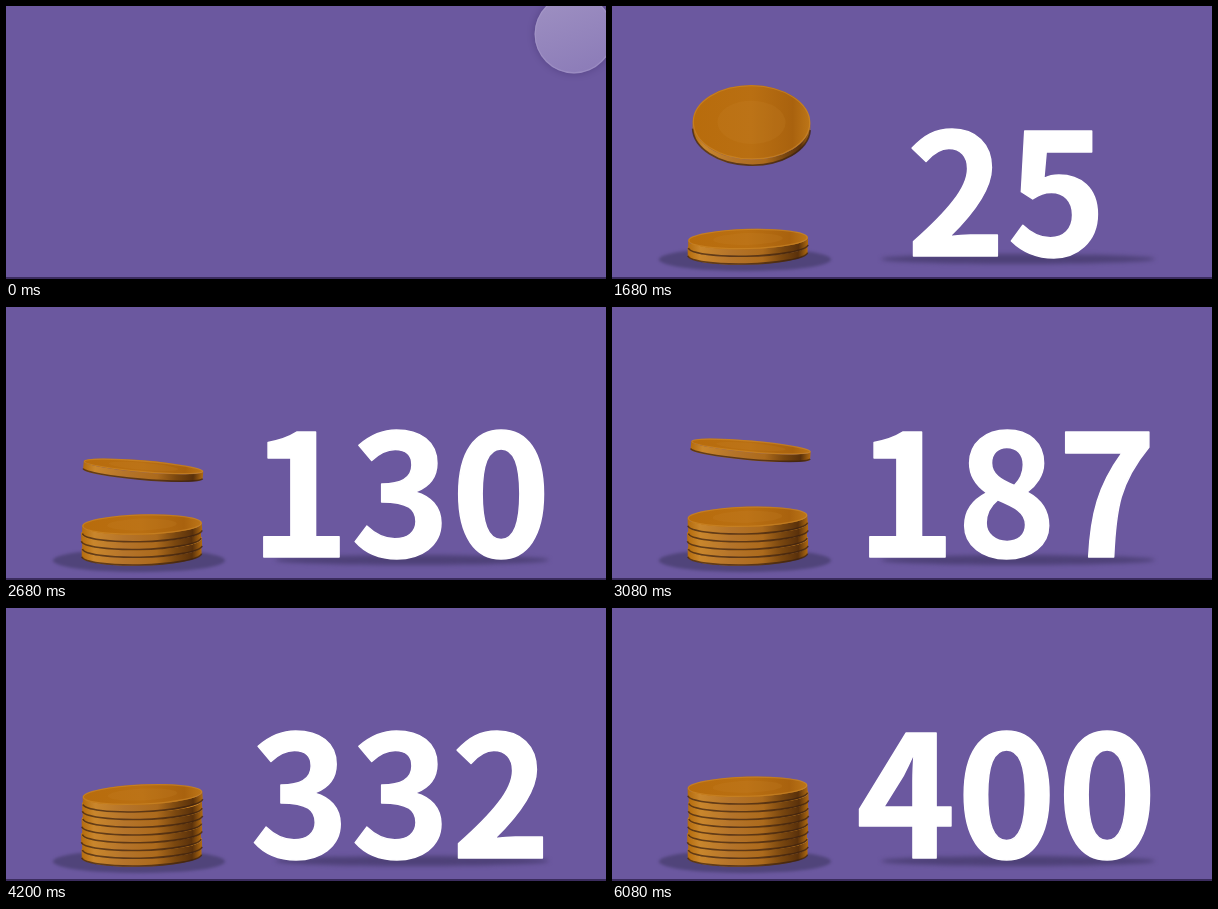
An HTML page with a canvas for the animation above (6160 ms loop, 600 by 273 pixels).

```html
<!DOCTYPE html>
<html lang="en">
<head>
<meta charset="utf-8">
<title>Coin counter</title>
<style>
  html, body { margin: 0; width: 100%; height: 100%; overflow: hidden; background: #6b589f; }
  canvas { display: block; width: 600px; height: 273px; }
</style>
</head>
<body>
<canvas id="stage" width="600" height="273"></canvas>
<script>
const ctx = document.getElementById('stage').getContext('2d');
const LOOP = 6160, STEP = 40;
const FLAT = 0.17, THICK = 7.75, STACK_X = 135.5, FLOOR = 248.5;
const FONT = 'bold 169px "Noto Sans CJK SC", "Noto Sans CJK JP", "Noto Sans CJK", sans-serif';

// Landing time of each coin, bottom to top
const LANDINGS = [890, 1228, 1770, 2285, 2720, 3130, 3540, 3960, 4500];
const SHIFT = [0, 0.5, -0.5, 0.5, 0, 1, 0.5, 1, 0];

// Counter: time, value, slope per ms
const COUNT = [
  [1080, 0, 0], [2280, 79, 0.1], [3080, 187, 0.132], [4200, 332, 0.118], [4840, 400, 0.08]
];

const clamp = (v, lo, hi) => Math.min(hi, Math.max(lo, v));

function countAt(t) {
  if (t <= COUNT[0][0]) return 0;
  for (let i = 1; i < COUNT.length; i++) {
    const [t0, v0, m0] = COUNT[i - 1], [t1, v1, m1] = COUNT[i];
    if (t > t1) continue;
    const d = t1 - t0, u = (t - t0) / d, u2 = u * u, u3 = u2 * u;
    return Math.round(v0 + (v1 - v0) * (3 * u2 - 2 * u3)
      + d * (m0 * (u3 - 2 * u2 + u) + m1 * (u3 - u2)));
  }
  return 400;
}

function ellipse(x, y, rx, ry, fill) {
  ctx.beginPath();
  ctx.ellipse(x, y, rx, ry, 0, 0, Math.PI * 2);
  ctx.fillStyle = fill;
  ctx.fill();
}

function gradient(x0, x1, stops) {
  const g = ctx.createLinearGradient(x0, 0, x1, 0);
  for (const [at, color] of stops) g.addColorStop(at, color);
  return g;
}

const EDGE = [[0, '#b56c0c'], [0.1, '#c9862c'], [0.35, '#b5742a'], [0.62, '#ac6a1c'],
              [0.78, '#7a470f'], [0.92, '#5a310b'], [1, '#b06a10']];
const FACE = [[0, '#b86c0c'], [0.5, '#b96f12'], [0.85, '#a9620e'], [1, '#bd7618']];

// open: 1 faces the viewer, 0 lies edge-on
function coin(x, y, open, tilt) {
  const lean = Math.sqrt(Math.max(0, 1 - open * open));
  const r = 55 + 5 * lean, ry = r * open, h = 1 + (THICK - 1) * lean;
  ctx.save();
  ctx.translate(x, y);
  ctx.rotate(tilt * Math.PI / 180);

  ctx.beginPath();
  ctx.ellipse(0, 0, r, ry, 0, Math.PI, 0, true);
  ctx.lineTo(r, h);
  ctx.ellipse(0, h, r, ry, 0, 0, Math.PI);
  ctx.closePath();
  ctx.fillStyle = gradient(-r, r, EDGE);
  ctx.fill();

  ctx.beginPath();
  ctx.ellipse(0, h - 0.7, r, ry, 0, 0.04, Math.PI - 0.04);
  ctx.strokeStyle = 'rgba(58, 32, 16, 0.7)';
  ctx.lineWidth = 1.6;
  ctx.stroke();

  ellipse(0, 0, r, ry, gradient(-r, r, FACE));
  ctx.beginPath();
  ctx.ellipse(0, 0, r - 0.7, Math.max(1, ry - 0.7), 0, 0, Math.PI * 2);
  ctx.strokeStyle = 'rgba(212, 144, 48, 0.5)';
  ctx.lineWidth = 1.2;
  ctx.stroke();
  ellipse(0, 0, r * 0.58, ry * 0.58, 'rgba(200, 132, 44, 0.18)');
  ctx.restore();
}

function drawCoins(t) {
  LANDINGS.forEach((land, i) => {
    const left = land - t;
    if (left > 320) return;
    const x = STACK_X + SHIFT[i], y = FLOOR - THICK * (i + 1);
    if (left > 0) {
      const height = 1.3 * left - 0.001 * left * left;
      const spin = Math.abs(Math.sin(Math.max(0, left - 45) / 103 * Math.PI / 2));
      const flat = FLAT - 0.07 * Math.min(1, left / 40);
      if (i && height < 25) {
        ellipse(x, y + THICK + 1, 59, 10, `rgba(50, 26, 14, ${0.85 * (1 - height / 25)})`);
      }
      coin(x + Math.min(left * 0.05, 8), y - height, Math.max(flat, spin), 5 * Math.sin(left / 30));
    } else {
      const u = -left;
      const wobble = u < 360 ? -4 * Math.exp(-u / 200) * Math.sin(u / 115) : 0;
      coin(x, y, FLAT, wobble - 1.5);
    }
  });
}

function drawShadows() {
  ctx.save();
  ctx.filter = 'blur(1.5px)';
  ellipse(133, 253.5, 86, 11.5, '#50447a');
  ctx.filter = 'blur(2px)';
  ellipse(406, 253, 137, 5, '#4e4178');
  ctx.restore();
}

function drawNumber(value) {
  ctx.font = FONT;
  ctx.letterSpacing = '1px';
  ctx.textAlign = 'center';
  ctx.fillStyle = ctx.strokeStyle = '#fff';
  ctx.lineWidth = 1.5;
  ctx.lineJoin = 'round';
  ctx.fillText(value, 395, 249.5);
  ctx.strokeText(value, 395, 249.5);
}

function drawBubble() {
  const g = ctx.createLinearGradient(550, -10, 580, 68);
  g.addColorStop(0, '#9d8fc1');
  g.addColorStop(1, '#8c7cb8');
  ctx.save();
  ctx.shadowColor = 'rgba(50, 35, 90, 0.4)';
  ctx.shadowBlur = 8;
  ellipse(568, 28, 39.5, 39.5, g);
  ctx.restore();
  ctx.beginPath();
  ctx.arc(568, 28, 38.8, 0, Math.PI * 2);
  ctx.strokeStyle = 'rgba(176, 164, 208, 0.4)';
  ctx.lineWidth = 1.2;
  ctx.stroke();
}

function draw(t) {
  ctx.fillStyle = '#6b589f';
  ctx.fillRect(0, 0, 600, 273);
  if (t < 40) drawBubble();

  const fade = clamp((t - 360) / 440, 0, 1);
  if (fade > 0) {
    ctx.globalAlpha = fade;
    drawShadows();
    drawNumber(countAt(t));
    ctx.globalAlpha = 1;
    drawCoins(t);
  }

  ctx.fillStyle = '#3b2c5e';
  ctx.fillRect(0, 271, 600, 2);
}

const start = performance.now();
function tick() {
  const t = (performance.now() - start) % LOOP;
  draw(Math.floor(t / STEP) * STEP);
  requestAnimationFrame(tick);
}
tick();
</script>
</body>
</html>
```
